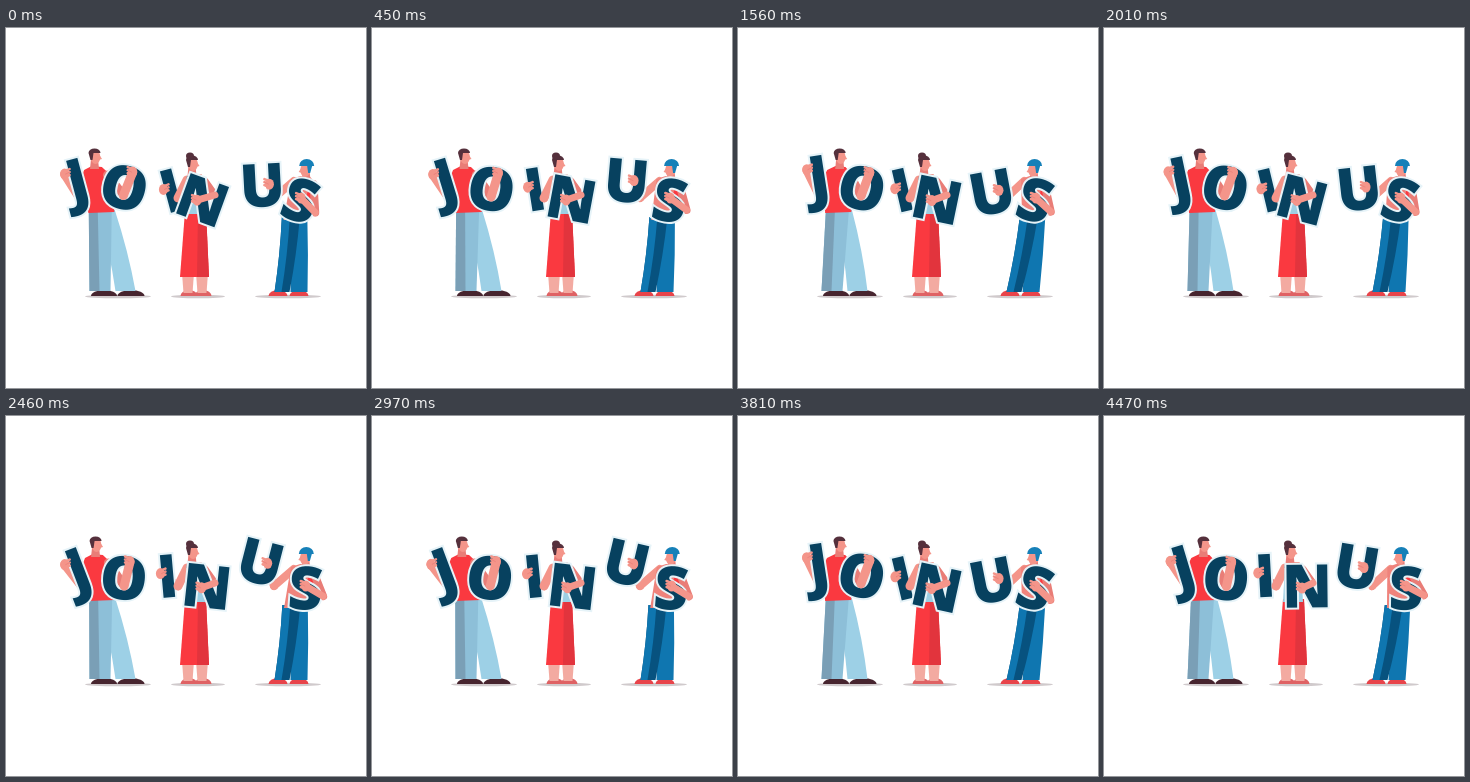
An HTML page with a canvas that plays this animation: 360x360 px, repeating every 4500 ms.

```html
<!DOCTYPE html>
<html lang="en">
<head>
<meta charset="utf-8">
<title>Join us</title>
<style>
html, body { margin: 0; width: 100%; height: 100%; overflow: hidden; background: #fff; }
canvas { display: block; }
</style>
</head>
<body>
<canvas id="stage" width="360" height="360"></canvas>
<script>
const ctx = document.getElementById('stage').getContext('2d');
const LOOP = 4500, STEP = 30, GROUND = 268;
const NAVY = '#07415f', RED = '#fa3940', DEEP_RED = '#e2343d';
const SKIN = '#f4958a', SHADE = '#e97d77', HAIR = '#55303c', HAT = '#1680b8';

function shape(color, ...pts) {
  ctx.fillStyle = color;
  ctx.beginPath();
  pts.forEach(([x, y]) => ctx.lineTo(x, y));
  ctx.fill();
}

function oval(color, x, y, rx, ry, from = 0, to = 2 * Math.PI) {
  ctx.fillStyle = color;
  ctx.beginPath();
  ctx.ellipse(x, y, rx, ry, 0, from, to);
  ctx.fill();
}

function limb(color, width, ...pts) {
  ctx.strokeStyle = color;
  ctx.lineWidth = width;
  ctx.lineCap = ctx.lineJoin = 'round';
  ctx.beginPath();
  pts.forEach(([x, y]) => ctx.lineTo(x, y));
  ctx.stroke();
}

// A length of cloth from one level to another, optionally bowed sideways.
function cloth(color, [x1, y1], [x2, y2], w1, w2, bow = 0) {
  const midX = (x1 + x2) / 2 + bow, midY = (y1 + y2) / 2, half = (w1 + w2) / 4;
  ctx.fillStyle = color;
  ctx.beginPath();
  ctx.moveTo(x1 - w1 / 2, y1);
  ctx.quadraticCurveTo(midX - half, midY, x2 - w2 / 2, y2);
  ctx.lineTo(x2 + w2 / 2, y2);
  ctx.quadraticCurveTo(midX + half, midY, x1 + w1 / 2, y1);
  ctx.fill();
}

function shoe(color, x, width) {
  oval(color, x, GROUND, width / 2, 6, Math.PI, 2 * Math.PI);
}

function shadow(x, radius) {
  oval('#d0cacc', x, GROUND + .5, radius, 1.8);
}

function hand([x, y], dir) {
  oval(SKIN, x, y, 4.5, 5.5);
  for (let dy = -3; dy <= 3; dy += 3) {
    limb(SKIN, 2.6, [x, y + dy], [x + dir * 5, y + dy - 2]);
  }
  limb(SHADE, .7, [x + dir, y], [x + dir * 5, y - 2]);
}

function head([x, y], dir, hair) {
  cloth(SHADE, [x - dir, y + 3], [x - dir, y + 13], 7, 9);
  oval(SKIN, x, y + 1, 4.8, 7);
  shape(SKIN, [x + dir * 4, y - 1], [x + dir * 6.5, y + 3], [x + dir * 3, y + 4]);
  oval(hair, x - dir, y - 3, 6, 4.5, Math.PI, 2 * Math.PI);
  cloth(hair, [x - dir * 4.5, y - 3], [x - dir * 4, y + 4], 5, 2);
}

function letter(char, x, y, degrees) {
  const angle = degrees * Math.PI / 180, cos = Math.cos(angle), sin = Math.sin(angle);
  return {
    at: (dx, dy) => [x + dx * cos - dy * sin, y + dx * sin + dy * cos],
    draw() {
      ctx.save();
      ctx.translate(x, y);
      ctx.rotate(angle);
      ctx.font = '800 60px "Open Sans", sans-serif';
      ctx.lineJoin = 'miter';
      ctx.miterLimit = 3;
      const box = ctx.measureText(char);
      const left = (box.actualBoundingBoxLeft - box.actualBoundingBoxRight) / 2;
      const base = (box.actualBoundingBoxAscent - box.actualBoundingBoxDescent) / 2;
      ctx.strokeStyle = '#e6f3f8';
      ctx.lineWidth = 4;
      ctx.strokeText(char, left, base);
      ctx.fillStyle = NAVY;
      ctx.fillText(char, left, base);
      ctx.restore();
    }
  };
}

// Moves a point sideways by an amount that goes from hip to head.
function leaner(hipY, headY, hipShift, headShift) {
  return (x, y) => {
    const rise = (hipY - y) / (hipY - headY);
    return [x + hipShift + (headShift - hipShift) * rise, y];
  };
}

function man(swing, sway) {
  const lean = leaner(185, 128, -2.5 * sway, -7 * sway);
  const J = letter('J', 73.5 - swing / 2 - 4.5 * sway, 159 - swing + 2 * sway, -15 + 4 * swing - 4 * sway);
  const O = letter('O', 121 + swing / 2 - 3 * sway, 161 - 1.5 * swing, 10 + 5 * swing);

  shadow(112, 33);
  shoe('#47252f', 98, 26);
  shoe('#47252f', 125, 27);
  cloth('#9dd0e6', lean(103, 182), [119.5, 263], 17, 20, 3);
  cloth('#8dbfd8', lean(97, 182), [94, 263], 23, 21);
  cloth('#7a9fb6', lean(90, 182), [88.5, 263], 9, 10);

  const elbow = J.at(2, 10), grip = J.at(-6, -16);
  limb(SHADE, 9, lean(87, 148), elbow);
  limb(SKIN, 9, elbow, grip);
  shape(RED, lean(92, 138), lean(84, 142), lean(80, 151), lean(85, 185),
    lean(111, 184), lean(111, 148), lean(102, 139));
  head(lean(96.5, 128), 1, HAIR);
  J.draw();
  hand(grip, 1);

  const bend = O.at(1, 8), hold = O.at(4, -17);
  limb(SHADE, 9, lean(107, 147), bend);
  O.draw();
  limb(SKIN, 9, bend, hold);
  hand(hold, -1);
}

function woman(swing, sway) {
  const I = letter('I', 163 + 2 * swing, 161 + 1.5 * swing, -9 - 6 * swing);
  const N = letter('N', 200 - 2.5 * swing - sway, 171 + swing, 9 + 8 * swing + 3 * sway);

  shadow(192, 27);
  for (const x of [182, 196]) {
    shoe('#df6264', x + 1, 17);
    cloth('#f3aaa1', [x, 245], [x, 265], 12, 9);
  }
  cloth(RED, [189.5, 183], [188.5, 249], 21, 29);
  cloth(DEEP_RED, [196, 183], [197, 249], 8, 12);

  const elbow = [172, 170], grip = I.at(-7, -3);
  limb(SHADE, 8, elbow, grip);
  I.draw();
  hand(grip, 1);
  limb(SKIN, 9, [181, 152], elbow);
  cloth(SKIN, [189, 146], [190, 162], 13, 23);
  cloth('#9ecfe3', [189, 149], [189, 186], 16, 20);
  cloth('#1f668b', [189, 148], [189, 152], 16, 17);
  head([187, 135], 1, HAIR);
  oval(HAIR, 184, 128, 4, 3.5);

  const bend = [209, 167], hold = N.at(-5, 2);
  limb(SHADE, 7, [199, 153], bend);
  N.draw();
  limb(SKIN, 7, bend, hold);
  hand(hold, -1);
}

function friend(swing, sway) {
  const lean = leaner(192, 138, -3.5 * sway, 2.5 * sway);
  const U = letter('U', 254.5 + swing + sway, 155.5 + 7 * swing - 5 * sway, 2 - 11 * swing + 6 * sway);
  const S = letter('S', 298.5 - 3 * swing - sway, 172, 10 + 9 * swing);

  shadow(282, 33);
  shoe('#e8444a', 272, 19);
  shoe('#e8444a', 293, 19);
  cloth('#0f76b0', lean(296, 189), [293, 264], 17, 17, 1);
  cloth('#07527f', lean(288, 189), [276, 264], 18, 15, 2);
  cloth('#0f76b0', lean(283, 189), [272, 264], 8, 7, 2);

  const grip = U.at(7, -1), elbow = [268, 170];
  limb(SHADE, 8, elbow, grip);
  limb(SKIN, 8, lean(287, 153), elbow);
  shape('#ef837c', lean(293, 148), lean(284, 151), lean(281, 192),
    lean(304, 192), lean(310, 157), lean(303, 149));
  shape(RED, lean(304, 151), lean(310, 157), lean(306, 178), lean(301, 170));
  const face = lean(297, 141);
  head(face, -1, HAT);
  oval(HAT, face[0] + 1.5, face[1] - 3, 7.5, 7, Math.PI, 2 * Math.PI);
  U.draw();
  hand(grip, -1);

  const bend = S.at(18, 7), hold = S.at(0, -2);
  limb(SHADE, 8, lean(307, 156), bend);
  S.draw();
  limb(SKIN, 7, bend, hold);
  hand(hold, -1);
}

function draw(time) {
  const wave = period => Math.cos(time / period * 2 * Math.PI);
  const swing = wave(1800), sway = wave(2700);
  ctx.fillStyle = '#fff';
  ctx.fillRect(0, 0, 360, 360);
  for (const person of [man, woman, friend]) person(swing, sway);
}

const start = performance.now();
function tick() {
  const elapsed = (performance.now() - start) % LOOP;
  draw(Math.floor(elapsed / STEP) * STEP);
  requestAnimationFrame(tick);
}
tick();
</script>
</body>
</html>
```
